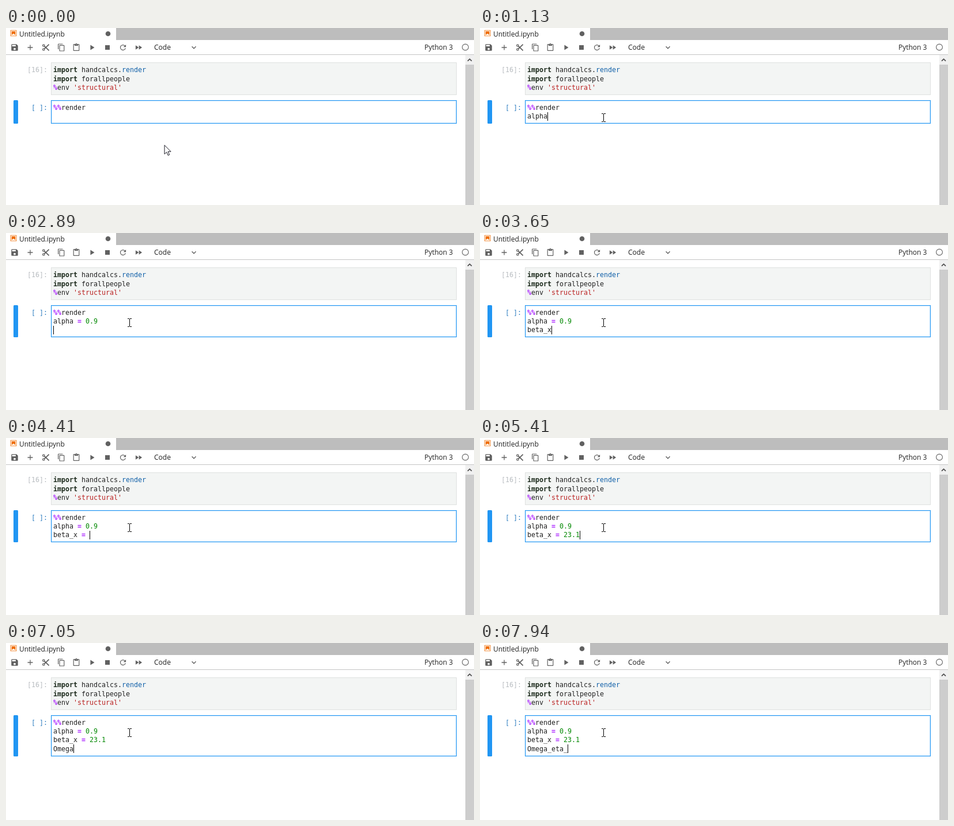
These frames come from a looping animation (812x309 px, 8 s). An HTML page with a canvas:

```html
<!DOCTYPE html>
<html lang="en">
<head>
<meta charset="utf-8">
<title>Notebook typing</title>
<style>
html, body { margin: 0; width: 100%; height: 100%; overflow: hidden; background: #fff; }
canvas { display: block; width: 812px; height: 309px; }
</style>
</head>
<body>
<canvas id="stage" width="812" height="309"></canvas>
<script>
const ctx = document.getElementById('stage').getContext('2d');
const LOOP = 8000;
const CHAR = 7;
const CODE_X = 82;
const MONO = '11.63px "DejaVu Sans Mono", monospace';
const UI = '12px "Open Sans", sans-serif';
const INK = '#212121', ICON = '#616161', BLUE = '#2196f3';
const PURPLE = '#aa22ff', GREEN = '#008800', RED = '#ba2121';

// [time, typed text, caret visible]
const typing = [
  [0, '', false], [380, '', true], [620, '', false],
  [870, 'a', true], [1000, 'alp', true], [1130, 'alpha', true],
  [1500, 'alpha ', true], [1630, 'alpha = ', true],
  [1890, 'alpha = ', false], [2130, 'alpha = ', true],
  [2260, 'alpha = 0', true], [2390, 'alpha = 0.', true], [2640, 'alpha = 0.9', true],
  [2890, '\n', true], [3140, 'be', true], [3270, 'beta', true],
  [3520, 'beta_', true], [3650, 'beta_x', true], [3780, 'beta_x ', true],
  [3910, 'beta_x = ', true], [4160, 'beta_x = ', false], [4410, 'beta_x = ', true],
  [4660, 'beta_x = ', false], [4910, 'beta_x = ', true],
  [5160, 'beta_x = 2', true], [5285, 'beta_x = 23.', true], [5410, 'beta_x = 23.1', true],
  [5670, '\n', true], [5920, '', false], [6290, '', true],
  [6540, 'O', true], [6670, 'Om', true], [6795, 'Ome', true],
  [6920, 'Omeg', true], [7050, 'Omega', true], [7300, 'Omega_', true],
  [7550, 'Omega_e', true], [7680, 'Omega_eta', true], [7940, 'Omega_eta_', true]
];

const pointer = [[0, 275, 204, 'arrow'], [130, 238, 180, 'arrow'], [255, 214, 156, 'beam']];

const at = (steps, t) => steps.filter(s => s[0] <= t).pop();

function rect(x, y, w, h, color) {
  ctx.fillStyle = color;
  ctx.fillRect(x, y, w, h);
}

function text(str, x, y, color, font = MONO) {
  ctx.font = font;
  ctx.fillStyle = color;
  ctx.fillText(str, x, y);
}

// Draws [text, color, bold] runs on the character grid.
function runs(parts, y) {
  let x = CODE_X;
  for (const [str, color, bold] of parts) {
    text(str, x, y, color, (bold ? 'bold ' : '') + MONO);
    x += str.length * CHAR;
  }
}

function assignment(line, y) {
  const [name, value] = line.split('=');
  const parts = [[name, INK]];
  if (value !== undefined) parts.push(['=', PURPLE, true], [value, GREEN]);
  runs(parts, y);
}

function icon(path, cx, cy, scale = 0.64, color = ICON, box = 24) {
  ctx.save();
  ctx.translate(cx, cy);
  ctx.scale(scale, scale);
  ctx.translate(-box / 2, -box / 2);
  ctx.fillStyle = color;
  ctx.fill(new Path2D(path), 'evenodd');
  ctx.restore();
}

function stroke(path, color, width) {
  ctx.strokeStyle = color;
  ctx.lineWidth = width;
  ctx.stroke(new Path2D(path));
}

function disc(x, y, r, color) {
  ctx.fillStyle = color;
  ctx.beginPath();
  ctx.arc(x, y, r, 0, 7);
  ctx.fill();
}

function ring(x, y, r, color, width) {
  ctx.strokeStyle = color;
  ctx.lineWidth = width;
  ctx.beginPath();
  ctx.arc(x, y, r, 0, 7);
  ctx.stroke();
}

function scissors(x, y) {
  ring(x - 3.7, y - 3.5, 1.7, ICON, 1.3);
  ring(x - 3.7, y + 3.5, 1.7, ICON, 1.3);
  stroke(`M${x - 2.5} ${y - 2.4}L${x + 5.6} ${y + 5.4}M${x - 2.5} ${y + 2.4}L${x + 5.6} ${y - 5.4}`, ICON, 1.8);
}

function toolbar() {
  icon('M17 3H5a2 2 0 0 0-2 2v14a2 2 0 0 0 2 2h14a2 2 0 0 0 2-2V7zM12 19a3 3 0 1 1 0-6a3 3 0 0 1 0 6zM15 9H5V5h10z', 15, 34);
  icon('M19 13h-6v6h-2v-6H5v-2h6V5h2v6h6z', 42, 34);
  scissors(69, 34);
  icon('M16 1H4a2 2 0 0 0-2 2v14h2V3h12zM19 5H8a2 2 0 0 0-2 2v14a2 2 0 0 0 2 2h11a2 2 0 0 0 2-2V7a2 2 0 0 0-2-2zM19 21H8V7h11z', 96, 34, 0.6);
  icon('M19 2h-4.2a3 3 0 0 0-5.6 0H5a2 2 0 0 0-2 2v16a2 2 0 0 0 2 2h14a2 2 0 0 0 2-2V4a2 2 0 0 0-2-2zM12 2a1 1 0 0 1 0 2a1 1 0 0 1 0-2zM19 20H5V4h2v3h10V4h2z', 122, 34, 0.6);
  icon('M8 5v14l11-7z', 149, 34);
  rect(172, 30, 8, 8, ICON);
  icon('M17.65 6.35A8 8 0 1 0 19.73 14h-2.08A6 6 0 1 1 12 6c1.66 0 3.14.69 4.22 1.78L13 11h7V4z', 203, 34);
  icon('M4 18l8.5-6L4 6zM13 6v12l8.5-6z', 230, 34);
  text('Code', 257, 38, INK, UI);
  stroke('M322.5 32.3L326 35.8L329.5 32.3', ICON, 1.4);
  text('Python 3', 726, 38, INK, UI);
  ring(797, 33.5, 5.4, ICON, 1.1);
}

function frame() {
  rect(0, 0, 812, 309, '#fff');
  rect(191, 0, 621, 21, '#bdbdbd');
  icon('M1.8 1.8h18.4v18.4H1.8zM3.3 3.3v15.4h15.4V3.3zM16.5 16.5l-5.4-4.3l-5.6 4.3v-11h11z', 13, 9, 0.58, '#ef6c00', 22);
  text('Untitled.ipynb', 23, 15, INK, UI);
  disc(177, 10, 4.3, ICON);
  toolbar();
  rect(0, 46, 812, 1, '#c4c4c4');

  rect(797, 47, 15, 262, '#cdcdcd');
  rect(797, 47, 15, 17, '#f0f0f0');
  stroke('M801 57.7L804.5 54.2L808 57.7', '#505050', 1.8);
}

function box(y, h, fill, line) {
  rect(78, y, 704, h, line);
  rect(79, y + 1, 702, h - 2, fill);
}

function importCell() {
  box(60, 57, '#f3f5f4', '#dfe1e0');
  text('[16]:', 37, 77, '#b9bdc1');
  const keyword = ['import', '#1c2a1c', true];
  runs([keyword, [' handcalcs.', INK], ['render', '#0f5fa8']], 77);
  runs([keyword, [' forallpeople', INK]], 93);
  runs([['%', PURPLE, true], ['env ', INK], ["'structural'", RED]], 108);
}

function activeCell(t) {
  const past = typing.filter(s => s[0] <= t);
  const [, current, caret] = past[past.length - 1];
  const row = past.filter(s => s[1] === '\n').length;
  const h = [41, 56, 72][row];
  const bases = [158, 173, 189];

  box(126, h, '#fff', BLUE);
  ctx.strokeStyle = 'rgba(33,150,243,.22)';
  ctx.lineWidth = 1;
  ctx.strokeRect(79.5, 127.5, 701, h - 3);
  ctx.fillStyle = BLUE;
  ctx.beginPath();
  ctx.roundRect(13, 126, 8, h, 1.5);
  ctx.fill();

  text('[ ]:', 44, 143, '#307fc1');
  runs([['%%', PURPLE, true], ['render', INK]], 143);
  ['alpha = 0.9', 'beta_x = 23.1'].slice(0, row).forEach((line, i) => assignment(line, bases[i]));
  const line = current.trimStart();
  assignment(line, bases[row]);
  if (caret) rect(CODE_X + line.length * CHAR, 147 + row * 15, 1, 15, '#000');
}

function drawPointer(t) {
  const [, x, y, kind] = at(pointer, t);
  ctx.save();
  ctx.translate(x, y);
  if (kind === 'arrow') {
    const shape = new Path2D('M0 .5V16.2L3.7 12.7L6.2 18.4L8.6 17.3L6.1 11.8H11.1Z');
    ctx.fillStyle = '#fff';
    ctx.fill(shape);
    ctx.strokeStyle = '#15151f';
    ctx.lineWidth = 1;
    ctx.stroke(shape);
  } else {
    rect(0, -6, 1, 13, '#000');
    for (const end of [-7, 7]) {
      rect(-3, end, 3, 1, '#000');
      rect(1, end, 3, 1, '#000');
    }
  }
  ctx.restore();
}

function draw(now) {
  const t = now % LOOP;
  frame();
  importCell();
  activeCell(t);
  drawPointer(t);
}

const start = performance.now();
function tick() {
  draw(performance.now() - start);
  requestAnimationFrame(tick);
}
tick();
</script>
</body>
</html>
```
